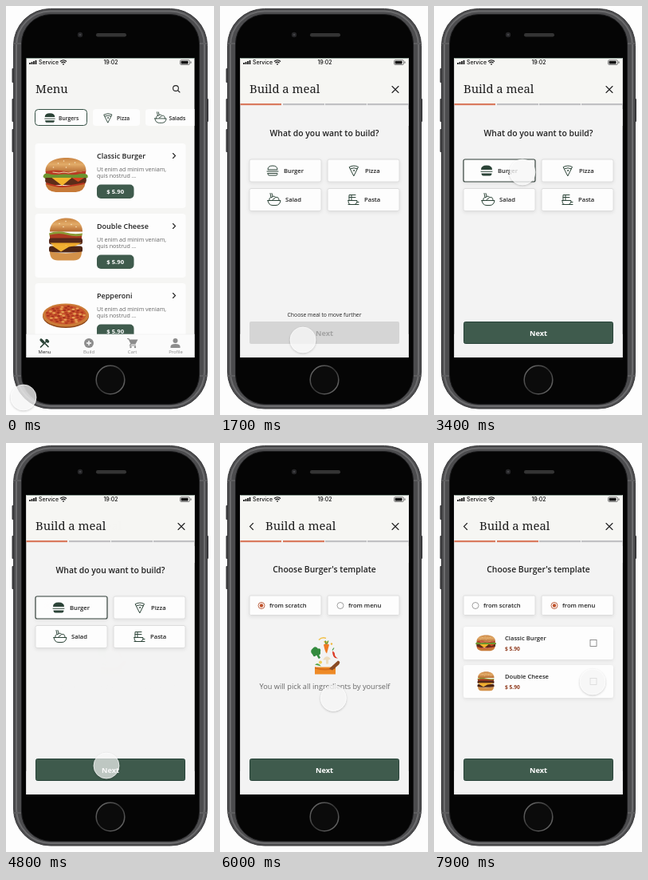
Animation of 261x512 px, one loop 8000 ms. Source, as an HTML page:

```html
<!DOCTYPE html>
<html lang="en">
<head>
<meta charset="utf-8">
<title>Meal builder</title>
<style>
html, body { margin: 0; width: 100%; height: 100%; overflow: hidden; background: #fdfdfd; }
svg { display: block; width: 100vw; height: 100vh; }
text { font-family: "Open Sans", "Noto Sans", sans-serif; fill: #222; }
.title { font: 500 14.8px "Noto Serif", serif; fill: #1d1d1d; }
.head { font-size: 10.4px; font-weight: 600; text-anchor: middle; }
.name { font-size: 9px; font-weight: 600; }
.desc { font-size: 7.08px; fill: #666; }
.price { font-size: 7.7px; font-weight: 700; fill: #fff; text-anchor: middle; }
.chip { font-size: 6.7px; font-weight: 600; }
.opt { font-size: 7.65px; font-weight: 600; }
.cost { font-size: 6.7px; font-weight: 700; fill: #8f3a1d; }
.tab { font-size: 5.9px; text-anchor: middle; fill: #888; }
.next { font-size: 9.2px; font-weight: 700; text-anchor: middle; fill: #fff; }
.status { font: 500 6.9px Inter, Roboto, sans-serif; fill: #111; }
.line { fill: none; stroke: #2c4438; stroke-width: 1; stroke-linecap: round; stroke-linejoin: round; }
.x { fill: none; stroke: #222; stroke-width: 1.1; stroke-linecap: round; }
.box { fill: #fdfdfd; stroke: #d6d6d6; stroke-width: .8; }
</style>
</head>
<body>
<svg viewBox="0 0 261 512" preserveAspectRatio="none">
<defs>
  <clipPath id="screen"><rect x="25.5" y="65" width="211" height="375"/></clipPath>
  <linearGradient id="ring" x1="0" y1="0" x2="1" y2="1">
    <stop offset="0" stop-color="#777"/><stop offset=".5" stop-color="#333"/><stop offset="1" stop-color="#777"/>
  </linearGradient>
  <linearGradient id="bun" x1="0" y1="0" x2="0" y2="1">
    <stop offset="0" stop-color="#c98443"/><stop offset=".45" stop-color="#e2ab68"/><stop offset="1" stop-color="#b4682f"/>
  </linearGradient>
  <filter id="soft" x="-20%" y="-20%" width="140%" height="150%">
    <feDropShadow dx="0" dy="1.5" stdDeviation="2" flood-opacity=".09"/>
  </filter>
  <filter id="lift" x="-40%" y="-40%" width="180%" height="180%">
    <feDropShadow dx="0" dy="1" stdDeviation="1.6" flood-opacity=".3"/>
  </filter>

  <!-- food, centred on the origin -->
  <g id="classic">
    <path d="M-25-5C-25-17-13-22 1-22S26-17 26-6Q14-2 0-4T-25-5Z" fill="url(#bun)"/>
    <g fill="#f7e3bd"><circle cx="-9" cy="-15" r=".8"/><circle cx="-2" cy="-18" r=".8"/><circle cx="5" cy="-14" r=".8"/><circle cx="12" cy="-16" r=".8"/><circle cx="-15" cy="-10" r=".8"/><circle cx="1" cy="-10" r=".8"/></g>
    <path d="M-25-5Q-12-8 0-5T26-6L25 0H-24Z" fill="#b93b24"/>
    <path d="M-16-4L-8-3L-2-4L4-3L14-5" fill="none" stroke="#e8c7a2" stroke-width="1.2"/>
    <path d="M-28 2Q-27-4-21-2T-8-1 6-1 18-2Q30-3 28 3L20 5-23 6Z" fill="#6c942f"/>
    <path d="M-25 3H26Q28 10 21 12H-19Q-27 11-25 3Z" fill="#5d2d19"/>
    <path d="M-17 3H8L-4 13Z" fill="#f3b42c"/><path d="M8 3H24L16 8Z" fill="#d6491f"/>
    <path d="M-25 10Q-13 13-4 14T25 10Q24 20 13 21H-12Q-24 20-25 10Z" fill="#c77a38"/>
    <path d="M-24 10Q-12 14-4 14T24 10" fill="none" stroke="#b9341f" stroke-width="2"/>
  </g>
  <g id="double">
    <path d="M-20-10C-20-22-10-27 1-27S21-22 21-10Z" fill="url(#bun)"/>
    <g fill="#f7e3bd"><circle cx="-8" cy="-20" r=".8"/><circle cx="0" cy="-23" r=".8"/><circle cx="7" cy="-19" r=".8"/><circle cx="-3" cy="-16" r=".8"/><circle cx="13" cy="-16" r=".8"/></g>
    <path d="M-21-8Q-10-12 0-9T21-8L20-3H-20Z" fill="#8a9a35"/>
    <path d="M-20-6Q-8-9 2-6T20-5V0H-20Z" fill="#ad3b22"/>
    <rect x="-21" y="-2" width="42" height="8" rx="3" fill="#54281a"/>
    <path d="M-20 4H20L9 9 0 7-9 11Z" fill="#eda82c"/>
    <rect x="-21" y="8" width="42" height="8" rx="3" fill="#4d2515"/>
    <path d="M-18 7H16L4 9-6 15Z" fill="#f0b032"/>
    <path d="M-20 15Q0 19 20 15Q20 26 10 26H-10Q-20 26-20 15Z" fill="#d39149"/>
  </g>
  <g id="pizza">
    <ellipse cx="0" cy="1.5" rx="29" ry="14.5" fill="#8c4519"/>
    <ellipse rx="29" ry="14.5" fill="#cb7c38"/>
    <ellipse cy="-.5" rx="25.500" ry="12" fill="#c9562d"/>
    <g id="toppings"></g>
  </g>
  <g id="harvest">
    <path d="M-13 16H13V25H-13Z" fill="#ee8a26"/>
    <path d="M-13 16Q0 20 13 16V18Q0 22-13 18Z" fill="#d56d1c"/>
    <path d="M5 18L16 8Q20 9 17 13L9 20Z" fill="#8a4b24"/>
    <path d="M-15-8Q-20-4-16 0Q-14 5-11 1Q-5 2-6-3Q-5-8-9-7Q-12-11-15-8Z" fill="#338a3e"/>
    <path d="M-10 0L-7 5" stroke="#338a3e" stroke-width="2.500"/>
    <path d="M-2-16Q3-18 4-14Q0-12-2-16Z" fill="#f0b83b"/>
    <path d="M-8-18Q-4-22 1-20" fill="none" stroke="#f2c24c" stroke-width="1.5"/>
    <path d="M-2-12Q1-15 5-12L2-1Q0-2-2-12Z" fill="#ef7a22"/>
    <path d="M1-13L0-17M2-13L4-17" stroke="#4c9b43" stroke-width="1.2"/>
    <path d="M9-4Q12-3 12 0T16 5Q9 6 9-4Z" fill="#dc3b26"/>
    <path d="M9-5L11-8" stroke="#4c9b43" stroke-width="1.2"/>
    <path d="M-3 7Q2-1 7 6L4 7V12H1V7Z" fill="#ecdcbe"/>
    <circle cx="-6" cy="10" r="2" fill="#f1cd55"/><circle cx="8" cy="-13" r="1.2" fill="#f0b83b"/>
    <path d="M-13 13Q-9 9-5 15Z" fill="#57a748"/>
  </g>

  <!-- icons, centred on the origin -->
  <g id="burgerLine" class="line"><path d="M-6-1.5Q-6-6 0-6T6-1.5ZM-7 1H7M-6 3.5H6V4.5Q6 6 4 6H-4Q-6 6-6 4.5Z"/></g>
  <g id="burgerFill"><path d="M-7-1Q-7-6.5 0-6.5T7-1ZM-6.5 3.5H6.5Q6.5 6.5 4 6.5H-4Q-6.5 6.5-6.5 3.5Z" fill="#2c4438"/><path class="line" d="M-7 1.2H7"/></g>
  <g id="slice" class="line"><path d="M-5.5-4.5Q0-7.5 5.5-4.5L0 6.5ZM-4.2-2.3Q0-4.3 4.2-2.3"/><circle cx="0" cy="0" r=".5"/></g>
  <g id="bowl" class="line"><path d="M-8 1H8Q7 7 2 7H-2Q-7 7-8 1ZM-6 1Q-7-3-3-3Q-1-6 2-3Q6-4 6 1M-4-3L-5-8M-2-4L-3-8M-2 0L1-2"/></g>
  <g id="pasta" class="line"><path d="M-6 1H5Q5 6 1 6H-3Q-6 6-6 1ZM-5 1V-6H3M-5-3H3M-2-6V1M-6 6H7M5 3H7"/></g>
  <g id="close"><path class="x" d="M-4-4L4 4M4-4L-4 4"/></g>
  <g id="radioOff"><circle r="4" fill="#fff" stroke="#888" stroke-width=".8"/></g>
  <g id="radioOn"><circle r="4" fill="#fff" stroke="#b5532f" stroke-width=".9"/><circle r="2.2" fill="#c0522b"/></g>
  <g id="nextOn"><rect x="37.500" y="395.500" width="187" height="27" rx="2" fill="#3f5b4d" stroke="#29443a"/><text class="next" x="131" y="412.5">Next</text></g>
  <g id="page"><rect x="25" y="65" width="212" height="375" fill="#f3f3f3"/><rect x="25" y="65" width="212" height="57" fill="#f6f6f3"/><use href="#close" x="220" y="104.500"/></g>
</defs>

<!-- phone -->
<g fill="#39393b"><rect x="7.500" y="78" width="4" height="18" rx="1"/><rect x="7.500" y="116" width="4" height="29" rx="1"/><rect x="7.500" y="154" width="4" height="29" rx="1"/><rect x="250" y="116" width="4" height="29" rx="1"/></g>
<rect x="9.500" y="3.500" width="243" height="500.500" rx="46" fill="#4c4c4e" stroke="#3a3a3c"/>
<rect x="13" y="6.500" width="236" height="494.500" rx="43" fill="none" stroke="#6b6b6d" stroke-width="2"/>
<path d="M9.500 47H20M242 47H252.500M9.500 463H20M242 463H252.500" stroke="#5e5e60" stroke-width="2"/>
<rect x="19.500" y="10.500" width="223" height="488" rx="37" fill="#050505" stroke="#1c1c1e"/>
<circle cx="93" cy="36" r="3.200" fill="#252527"/><circle cx="93" cy="36" r="1.300" fill="#444448"/>
<rect x="113" y="34" width="38" height="4.500" rx="2.200" fill="#343434"/>
<circle cx="131" cy="468" r="17.800" fill="#0b0b0b" stroke="url(#ring)" stroke-width="1.500"/>

<g clip-path="url(#screen)">
  <g id="menu">
    <rect x="25" y="65" width="212" height="375" fill="#f5f5f3"/>
    <text class="title" x="37" y="109">Menu</text>
    <circle cx="213" cy="103" r="3.400" class="x"/><path class="x" d="M215.600 105.600L218 108"/>
    <g fill="#fdfdfd">
      <rect x="36.500" y="129.500" width="65" height="20" rx="4" stroke="#345044"/>
      <rect x="109" y="129" width="59" height="21" rx="4"/>
      <rect x="175" y="129" width="66" height="21" rx="4"/>
    </g>
    <use href="#burgerFill" transform="translate(55 140) scale(.9)"/><text class="chip" x="66" y="142.500">Burgers</text>
    <use href="#slice" transform="translate(128 140) scale(.9)"/><text class="chip" x="139" y="142.500">Pizza</text>
    <use href="#bowl" transform="translate(194 140) scale(.9)"/><text class="chip" x="204.500" y="142.500">Salads</text>
    <g id="cards"></g>
    <use href="#classic" x="74.500" y="212"/>
    <use href="#double" x="75" y="292.500"/>
    <use href="#pizza" x="75" y="387"/>
    <rect x="25" y="411" width="212" height="29" fill="#fbfbfb"/><path d="M25 411H237" stroke="#ececec" stroke-width=".6"/>
    <g stroke="#2c4438" stroke-width="1.700" stroke-linecap="round"><path d="M44 417.500L53 426.500M52 418.500L43.500 427"/><path d="M44 418L47 421" stroke-width="3.200"/><path d="M51 418.500L52.500 420" stroke-width="3.500"/></g>
    <circle cx="104" cy="422" r="6" fill="#8d8d8d"/><path d="M101 422H107M104 419V425" stroke="#fff" stroke-width="1.400"/>
    <path d="M152 416.500H154L157 423H162L164.500 418H155" fill="#8d8d8d" stroke="#8d8d8d" stroke-width="1.200"/><path d="M156.500 423L155.500 425H163" fill="none" stroke="#8d8d8d" stroke-width="1.200"/>
    <g fill="#8d8d8d"><circle cx="156.500" cy="427" r="1.200"/><circle cx="162" cy="427" r="1.200"/><circle cx="212.500" cy="419" r="3"/><path d="M206.500 428V426Q207 423 212.500 423T218.500 426V428Z"/></g>
    <text class="tab" x="48.500" y="435" style="fill:#222">Menu</text><text class="tab" x="104" y="435">Build</text><text class="tab" x="158.500" y="435">Cart</text><text class="tab" x="213" y="435">Profile</text>
  </g>

  <g id="build">
    <use href="#page"/>
    <text class="title" x="37" y="109">Build a meal</text>
    <g id="progress1"></g>
    <text class="head" x="131" y="163">What do you want to build?</text>
    <g id="meals" filter="url(#soft)"></g>
    <g id="idle">
      <use href="#burgerLine" x="66" y="206"/>
      <text x="131" y="388.500" font-size="6.800" text-anchor="middle">Choose meal to move further</text>
      <rect x="37" y="395" width="188" height="28" rx="2" fill="#d5d5d5"/><text class="next" x="131" y="412.500" style="fill:#a2a2a2">Next</text>
    </g>
    <g id="picked">
      <rect x="37" y="192" width="90" height="28" rx="2" fill="none" stroke="#3d4a44" stroke-width="1.200"/>
      <use href="#burgerFill" x="66" y="206"/><use href="#nextOn"/>
    </g>
    <use href="#slice" x="168" y="206"/><use href="#bowl" x="68" y="242.500"/><use href="#pasta" x="167" y="242.500"/>
    <text class="opt" x="80" y="208.800">Burger</text><text class="opt" x="182" y="208.800">Pizza</text>
    <text class="opt" x="82" y="245.300">Salad</text><text class="opt" x="181" y="245.300">Pasta</text>
  </g>

  <g id="template">
    <use href="#page"/>
    <path class="x" d="M41.500 100.500L37.500 104.500L41.500 108.500"/>
    <text class="title" x="57" y="109">Build a meal</text>
    <g id="progress2"></g>
    <text class="head" x="131" y="161.500">Choose Burger's template</text>
    <g filter="url(#soft)"><rect class="box" x="37" y="191" width="90" height="24.500" rx="1.500"/><rect class="box" x="135" y="191" width="90" height="24.500" rx="1.500"/></g>
    <text class="opt" x="62" y="206">from scratch</text><text class="opt" x="161" y="206">from menu</text>
    <g id="scratch">
      <use href="#radioOn" x="52" y="203.500"/><use href="#radioOff" x="151" y="203.500"/>
      <use href="#harvest" x="132" y="264.500"/>
      <text x="131.500" y="308" font-size="9.200" text-anchor="middle" style="fill:#666">You will pick all ingredients by yourself</text>
    </g>
    <g id="fromMenu">
      <use href="#radioOff" x="52" y="203.500"/><use href="#radioOn" x="151" y="203.500"/>
      <g fill="#fdfdfd" filter="url(#soft)"><rect x="37" y="230" width="188" height="41" rx="3"/><rect x="37" y="278" width="188" height="41" rx="3"/></g>
      <use href="#classic" transform="translate(65 250.500) scale(.46)"/><use href="#double" transform="translate(65 298.500) scale(.5 .45)"/>
      <text class="opt" x="89" y="247">Classic Burger</text><text class="cost" x="89" y="260">$ 5.90</text>
      <text class="opt" x="89" y="295">Double Cheese</text><text class="cost" x="89" y="308">$ 5.90</text>
      <g fill="#fff" stroke="#777" stroke-width=".8"><rect x="196" y="246.500" width="8" height="8"/><rect x="196" y="294.500" width="8" height="8"/></g>
    </g>
    <use href="#nextOn"/>
  </g>

  <!-- status bar -->
  <path d="M25 65.300H237" stroke="#5b7468" stroke-width=".8"/>
  <path d="M30 73V71M32.500 73V70M35 73V69M37.500 73V68" stroke="#111" stroke-width="1.700"/>
  <text class="status" x="41" y="73">Service</text><text class="status" x="131.500" y="73" text-anchor="middle">19:02</text>
  <path d="M68 69.500Q72 66 76 69.500M69.500 71.200Q72 69 74.500 71.200" fill="none" stroke="#111" stroke-width="1.200"/><circle cx="72" cy="72.800" r=".9" fill="#111"/>
  <rect x="218.500" y="67.700" width="12" height="5.800" rx="1.500" fill="none" stroke="#555" stroke-width=".7"/><rect x="219.600" y="68.800" width="9" height="3.600" rx=".6" fill="#111"/><path d="M232 69.500V71.700" stroke="#555"/>
</g>

<g id="cursor">
  <circle id="disc" r="16" fill="#f6f6f6" filter="url(#lift)"/>
  <circle r="16" fill="none" stroke="#fff" stroke-opacity=".7"/>
</g>
</svg>

<script>
const LOOP = 8000;
const $ = id => document.getElementById(id);
const clamp = v => Math.max(0, Math.min(1, v));
const ease = p => p * p * (3 - 2 * p);

const cards = [
  [172, 81, "Classic Burger"],
  [260, 80, "Double Cheese"],
  [347, 80, "Pepperoni"]
];
$("cards").innerHTML = cards.map(([y, h, name]) => `
  <rect x="36.500" y="${y}" width="189" height="${h}" rx="4" fill="#fdfdfd"/>
  <text class="name" x="114" y="${y + 19}">${name}</text>
  <path class="x" d="M209.500 ${y + 12.5}l3 3l-3 3"/>
  <text class="desc" x="114" y="${y + 34.5}">Ut enim ad minim veniam,</text>
  <text class="desc" x="114" y="${y + 43}">quis nostrud ...</text>
  <rect x="114" y="${y + 51.5}" width="46.500" height="17.500" rx="5" fill="#3f5b4d"/>
  <text class="price" x="137.200" y="${y + 63}">$ 5.90</text>`).join("");

$("meals").innerHTML = [[37, 192], [135, 192], [37, 228.5], [135, 228.5]]
  .map(([x, y]) => `<rect class="box" x="${x}" y="${y}" width="90" height="28" rx="2"/>`).join("");

$("toppings").innerHTML = Array.from({ length: 60 }, (_, i) => {
  const a = i * 2.4, r = Math.sqrt((i + .5) / 60);
  const fill = ["#a5301c", "#e6a455", "#b23a20"][i % 3];
  return `<ellipse cx="${24 * r * Math.cos(a)}" cy="${11 * r * Math.sin(a) - .5}" rx="2" ry="1.100" fill="${fill}"/>`;
}).join("");

const progress = done => [25, 79, 132, 185]
  .map((x, i) => `<rect x="${x}" y="122" width="52" height="2.200" fill="${i < done ? "#d97a5e" : "#c0c0c3"}"/>`).join("");
$("progress1").innerHTML = progress(1);
$("progress2").innerHTML = progress(2);

// time, x, y
const path = [
  [0, 22, 490], [900, 104, 422], [1300, 104, 422], [1600, 104, 418],
  [1900, 104, 418], [2500, 111, 208], [3800, 111, 208], [4400, 126, 404],
  [5600, 126, 404], [6500, 165, 202], [7300, 165, 202], [7900, 199, 299], [LOOP, 199, 299]
];
// centre and half length of each press
const presses = [[1200, 250], [5075, 325], [6800, 250]];
// layer, start and end of its fade-in
const fades = [
  ["build", 1300, 1600], ["picked", 3300, 3400],
  ["template", 4800, 5050], ["fromMenu", 6950, 7100]
];

function draw(t) {
  for (const [id, from, to] of fades) $(id).style.opacity = clamp((t - from) / (to - from));
  $("idle").style.opacity = 1 - clamp((t - 3300) / 100);
  $("scratch").style.opacity = 1 - clamp((t - 6950) / 150);

  const i = path.findIndex((p, n) => n && t < p[0]);
  const [t0, x0, y0] = path[i - 1], [t1, x1, y1] = path[i];
  const p = ease((t - t0) / (t1 - t0));
  const press = Math.max(...presses.map(([c, w]) => clamp(2 - 2 * Math.abs(t - c) / w)));
  const x = x0 + (x1 - x0) * p, y = y0 + (y1 - y0) * p;
  $("cursor").setAttribute("transform", `translate(${x} ${y})`);
  $("disc").style.opacity = .78 - .26 * press;
}

const start = performance.now();
function tick() {
  draw((performance.now() - start) % LOOP);
  requestAnimationFrame(tick);
}
draw(0);
requestAnimationFrame(tick);
</script>
</body>
</html>
```
